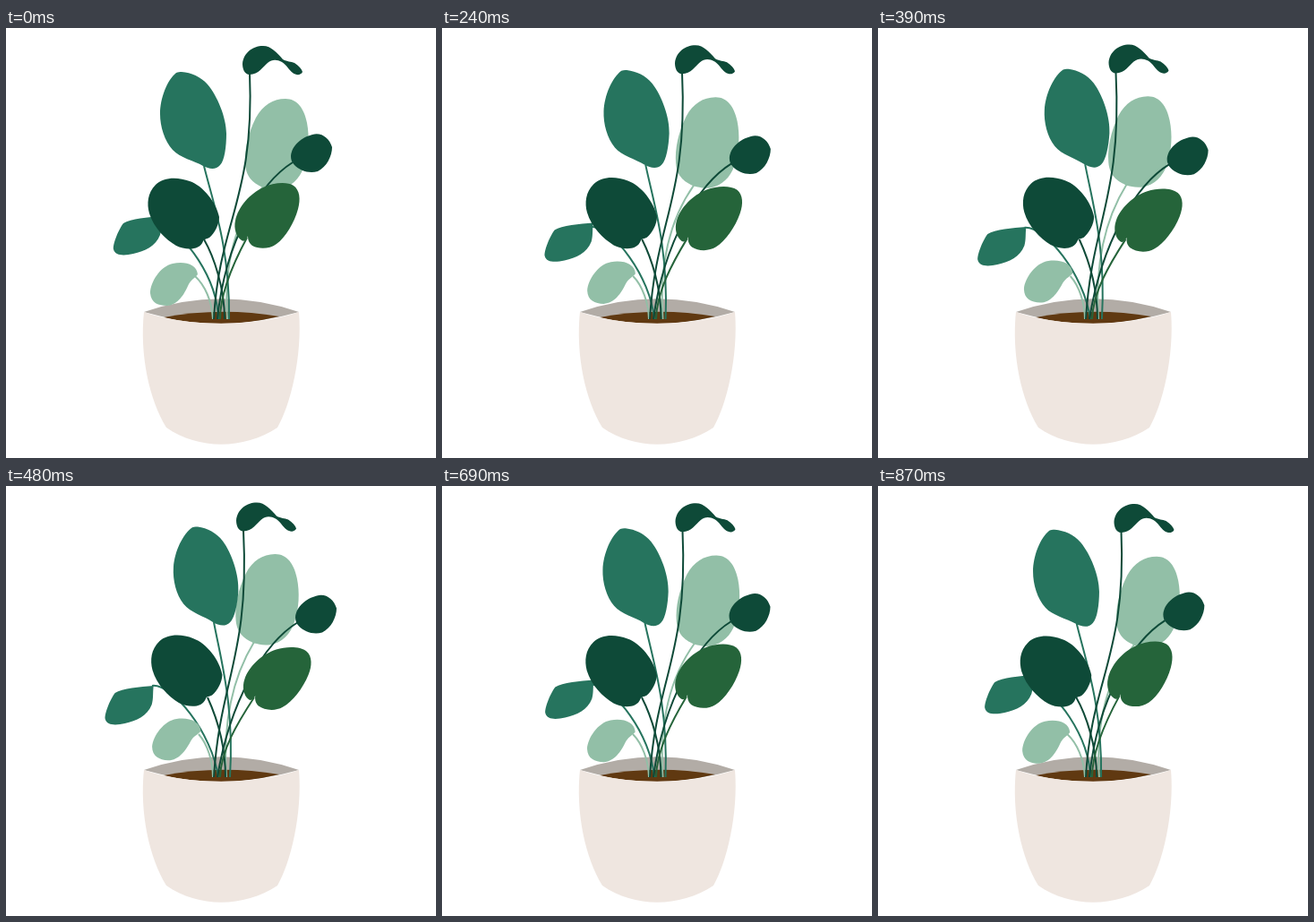
These frames come from a looping animation (480 by 480 pixels, 0.9 s). An HTML page:

```html
<!DOCTYPE html>
<html lang="en">
<head>
<meta charset="utf-8">
<title>Swaying plant</title>
<style>
  html, body { margin: 0; width: 100%; height: 100%; overflow: hidden; background: #fff; }
  svg { display: block; width: 100vw; height: 100vh; }
</style>
</head>
<body>
<svg id="stage" viewBox="0 0 480 480">
  <path fill="#b2aca6" d="M154 317Q240 287.5 327 317Q240 342 154 317Z"/>
  <path fill="#603911" d="M176 323Q240 311 305 322Q270 330 240 330Q205 330 176 323Z"/>
  <path fill="#efe6e0" d="M154 317C200 334 280 334 327 317C331 365 318 420 303 446C265 471 215 471 179 446C160 415 149 365 154 317Z"/>
  <g id="plant"></g>
</svg>
<script>
const LOOP = 900, STEP = 30;
const DARK = '#0e4a38', TEAL = '#26745e', GREEN = '#25643a', LIGHT = '#92bfa7';

// leaf: colour, shape at rest, sway as [dx, dy, angle, pivot x, pivot y]
// stem: colour, curve at rest, curve at full sway
const parts = [
  { leaf: LIGHT, d: 'M312 79C325 79 333 90 336 106C339 122 338 140 332 156C328 168 318 178 305 180C296 181 292 179 287 178C278 174 268 168 267 152C266 136 270 118 279 100C287 86 298 79 312 79Z',
    sway: [-10, -2.5, -1, 287, 178] },
  { stem: LIGHT, a: [287, 177, 255, 215, 243, 265, 247, 325], b: [277, 174, 252, 215, 242, 265, 246, 325] },
  { stem: LIGHT, a: [211, 277, 222, 287, 230, 305, 231, 325], b: [215, 277, 225, 288, 231, 308, 231, 325] },
  { stem: TEAL, a: [172, 220, 200, 228, 236, 280, 237, 325], b: [163, 223, 185, 220, 230, 275, 237, 325] },
  { stem: TEAL, a: [221, 154, 231, 195, 250, 245, 249, 325], b: [232, 152, 240, 195, 255, 245, 250, 325] },
  { stem: DARK, a: [320, 150, 285, 172, 245, 235, 236, 325], b: [326, 152, 288, 175, 250, 240, 236, 325] },
  { stem: DARK, a: [272, 50, 278, 190, 238, 215, 232, 325], b: [265, 50, 272, 190, 239, 215, 232, 325] },
  { stem: DARK, a: [221, 236, 232, 255, 244, 290, 244, 325], b: [225, 236, 236, 260, 245, 290, 245, 325] },
  { stem: GREEN, a: [269, 234, 255, 260, 239, 295, 239, 325], b: [277, 236, 258, 265, 240, 295, 239, 325] },
  { leaf: TEAL, d: 'M174 210C159 211 139 213 131 218C125 226 119 242 120 247C122 255 133 254 142 252C155 249 167 244 172 231C174 224 173 219 174 210Z',
    sway: [-9.3, 13, 0, 174, 210] },
  { leaf: LIGHT, d: 'M214 275C213 264 200 260 186 263C172 266 161 284 161 296C162 307 170 310 180 310C192 309 199 297 203 288C206 281 210 280 214 275Z',
    sway: [3.5, -1.2, 4, 214, 274] },
  { leaf: TEAL, d: 'M196 49C207 50 217 54 225 63C236 76 246 100 246 118C246 132 244 148 239 153C234 159 226 157 220 154C210 148 194 145 186 136C177 126 172 110 172 96C172 78 180 58 190 50C192 49 194 49 196 49Z',
    sway: [11, -2, 3.8, 221, 154] },
  { leaf: DARK, d: 'M318 143C319 131 330 122 342 119C352 116 361 123 364 133C364 143 358 155 348 160C338 163 328 159 322 153C319 150 318 147 318 143Z',
    sway: [5, 3.5, 0, 319, 148] },
  { leaf: DARK, d: 'M272 52C266 52 264 45 264 40C265 28 275 20 287 20C296 20 303 28 309 35C314 38 318 37 322 39C327 42 330 46 331 49C329 53 324 53 320 50C316 47 313 41 308 38C302 35 297 35 292 39C287 43 282 52 272 52Z',
    sway: [-7, -1.5, 0, 272, 52] },
  { leaf: DARK, d: 'M220 238C221 235 224 236 227 234C233 229 238 219 238 211C235 195 220 176 205 171C192 166 176 166 167 175C158 184 157 196 160 207C165 223 178 236 190 243C200 248 216 249 220 238Z',
    sway: [3, -0.5, 1, 221, 236] },
  { leaf: GREEN, d: 'M270 232C269 236 266 239 263 237C257 233 254 224 256 215C259 200 272 185 287 178C298 173 313 171 321 176C328 181 329 191 326 202C322 217 312 234 302 241C294 247 282 247 275 243C271 240 270 236 270 232Z',
    sway: [8, 2, 7, 270, 234] }
];

const plant = document.getElementById('plant');
for (const p of parts) {
  p.el = document.createElementNS('http://www.w3.org/2000/svg', 'path');
  p.el.setAttribute('fill', p.leaf || 'none');
  if (p.leaf) p.el.setAttribute('d', p.d);
  else {
    p.el.setAttribute('stroke', p.stem);
    p.el.setAttribute('stroke-width', 2);
  }
  plant.append(p.el);
}

function pose(k) {
  for (const { el, leaf, sway, a, b } of parts) {
    if (leaf) {
      const [dx, dy, angle, x, y] = sway;
      el.setAttribute('transform', `translate(${dx * k} ${dy * k}) rotate(${angle * k} ${x} ${y})`);
    } else {
      const [x, y, ...rest] = a.map((v, i) => v + (b[i] - v) * k);
      el.setAttribute('d', `M${x} ${y}C${rest.join(' ')}`);
    }
  }
}

// Even swing there and back, held in short steps.
function draw(now) {
  const t = Math.floor((now % LOOP) / STEP) * STEP;
  const swing = 1 - Math.abs(1 - 2 * t / LOOP);
  pose(swing * 1.07);
  requestAnimationFrame(draw);
}

pose(0);
requestAnimationFrame(draw);
</script>
</body>
</html>
```
